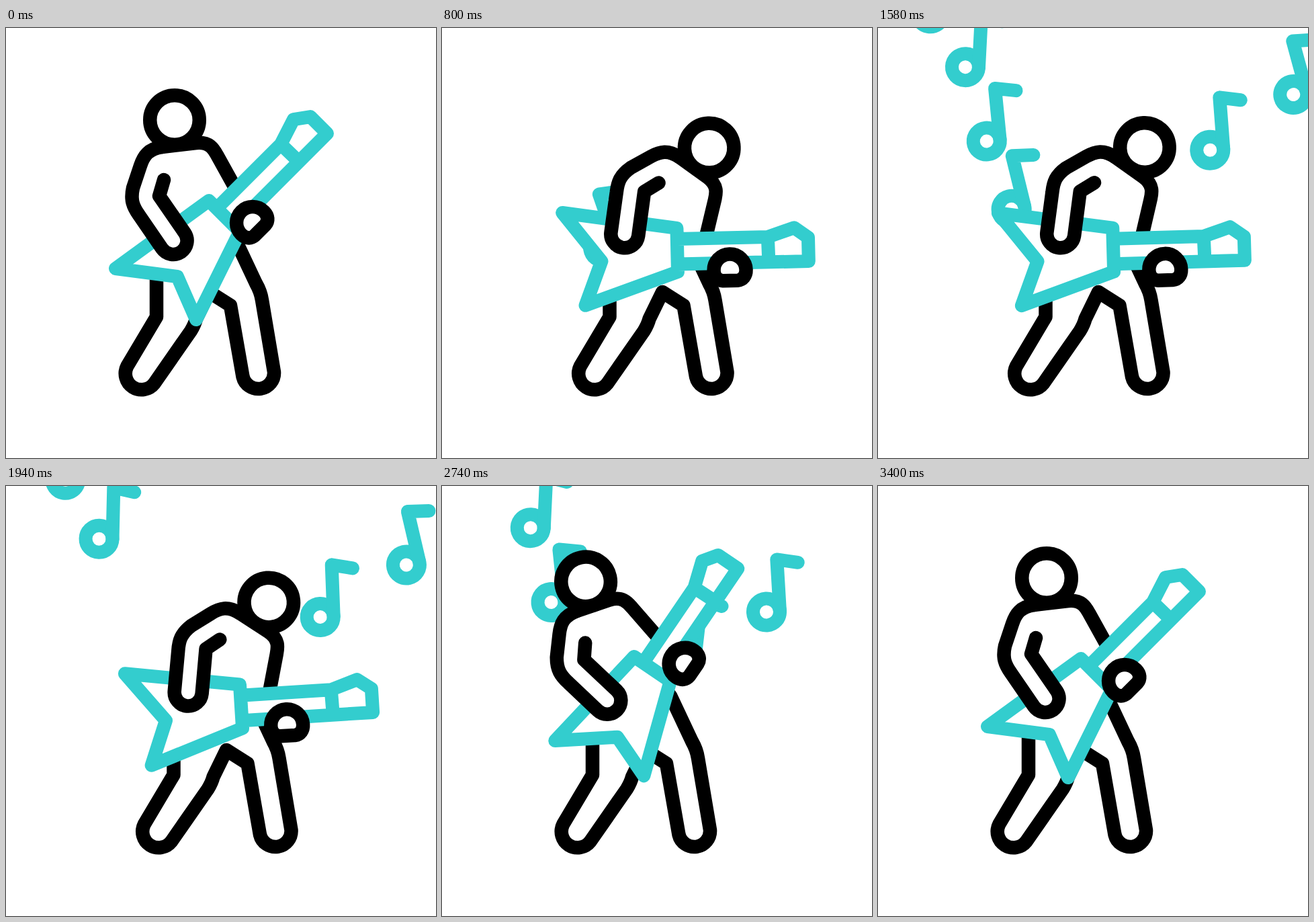
An HTML page that plays this animation: 640x640 px, repeating every 3600 ms.

```html
<!DOCTYPE html>
<html lang="en">
<head>
<meta charset="utf-8">
<title>Guitarist</title>
<style>
  html, body { margin: 0; width: 100%; height: 100%; overflow: hidden; background: #fff; }
  svg { display: block; width: 100%; height: 100%; }
  .ink, .teal { fill: #fff; stroke: #000; stroke-width: 20.5; stroke-linecap: round; stroke-linejoin: round; }
  .teal { stroke: #33cdce; stroke-width: 20; }
  .line { fill: none; }
</style>
</head>
<body>
<svg viewBox="0 0 640 640">
  <defs>
    <g id="note" class="teal">
      <circle r="20"/>
      <path class="line" d="M20 0V-77L51 -70.7"/>
    </g>
    <path id="leftPath" d="M245 332C205 290 172 230 163 176S138 40 70 -30L50 -50"/>
    <path id="rightPath" d="M340 251C430 211 595 156 690 20"/>
  </defs>
  <g id="notes"></g>
  <path id="legs" class="ink" d="M224 345V430L180.4 503.3A24 24 0 0 0 220.7 529L275 451Q281 441 283 433L302.5 393L334 413L352.5 519A23.6 23.6 0 0 0 399 512L381 405Q379 392 372 380L340 312"/>
  <g id="torso">
    <path fill="#fff" d="M232 177L283 171L313 188L350 254L258 320L200 260Z"/>
    <path class="ink line" d="M232 177L283 171C303 169 309 180 314 189L350 254"/>
  </g>
  <circle id="head" class="ink" cx="251" cy="137" r="36.75"/>
  <g id="guitar">
    <path class="teal" d="M163 358L302 257L348 303L283 434L255 370ZM313.5 268.5L409 173L428 136L453 132L478 157L340 295M409 173L436 199"/>
    <path id="hand" class="ink" d="M-24 0A24 24 0 0 1 24 0C24 9 19 15 11 15.5H-11C-19 15 -24 9 -24 0Z"/>
  </g>
  <path id="arm" class="ink" d="M232 177C212 180 205 190 200 205L189 238C185 256 189 266 198 278.5L232 328A20.5 20.5 0 0 0 266 305L228 250L235 226"/>
</svg>
<script>
const LOOP = 3600, BEAT = 200, FLIGHT = 1200;
const el = id => document.getElementById(id);
const move = (node, value) => node.setAttribute("transform", value);
const ease = p => p * p * (3 - 2 * p);

// shift, lean, guitar angle, guitar x, guitar y, hand along neck, hand across neck, torso slide
const POSES = {
  A: [0, 0, 0, 0, 0, 83, 68, 0],
  C: [25.5, 42.4, 43.65, 3.3, 0, 138, 63, -4.5],
  D: [25.5, 29.7, 33, -3, 0, 84, 65.5, -6.5],
  E: [0, -15.3, -13.6, -9, 5, 97, 67, -5]
};
// One letter per beat; an underscore stretches the move over two beats
const KEYS = [..."A_CDCDCDCDC_EAEAEA"]
  .map((name, i) => ({ time: i * BEAT, pose: POSES[name] }))
  .filter(key => key.pose);

function poseAt(t) {
  const next = KEYS.findIndex(key => key.time > t);
  if (next < 0) return POSES.A;
  const from = KEYS[next - 1], to = KEYS[next];
  const p = ease((t - from.time) / (to.time - from.time));
  return from.pose.map((v, i) => v + (to.pose[i] - v) * p);
}

// Notes fly along a path; "lead" is the part of the flight before they appear
const STREAMS = [
  { path: el("leftPath"), travel: 468, lead: 18, tilt: -19.6, turn: 0.075, bursts: [[632, 4], [2000, 2]] },
  { path: el("rightPath"), travel: 606, lead: 90, tilt: 8, turn: -0.073, bursts: [[839, 4], [2216, 2]] }
];
const notes = STREAMS.flatMap(stream => stream.bursts.flatMap(([first, count]) =>
  Array.from({ length: count }, (_, i) => {
    const node = document.createElementNS("http://www.w3.org/2000/svg", "use");
    node.setAttribute("href", "#note");
    el("notes").append(node);
    return { ...stream, node, start: first + i * BEAT, length: stream.path.getTotalLength() };
  })));

function drawNote({ node, path, travel, lead, tilt, turn, start, length }, t) {
  const p = (t - start) / FLIGHT;
  const s = travel * ease(p) - lead;
  const visible = p > 0 && p < 1 && s >= 0 && s < length;
  node.setAttribute("visibility", visible ? "visible" : "hidden");
  if (!visible) return;
  const { x, y } = path.getPointAtLength(s);
  move(node, `translate(${x} ${y}) rotate(${tilt + turn * s})`);
}

function draw(t) {
  const [shift, lean, swing, gx, gy, along, across, slide] = poseAt(t);
  const body = `translate(${shift} 0) rotate(${lean} 258 314)`;
  move(el("legs"), `translate(${shift} 0)`);
  move(el("head"), body);
  move(el("torso"), `${body} translate(${slide} 0)`);
  move(el("arm"), `${body} translate(${slide} 0)`);
  move(el("guitar"), `translate(${shift + gx} ${gy}) rotate(${swing} 260.3 300.7)`);
  move(el("hand"), `translate(260.3 300.7) rotate(-45) translate(${along} ${across})`);
  notes.forEach(note => drawNote(note, t));
}

const began = performance.now();
function tick() {
  draw((performance.now() - began) % LOOP);
  requestAnimationFrame(tick);
}
tick();
</script>
</body>
</html>
```
